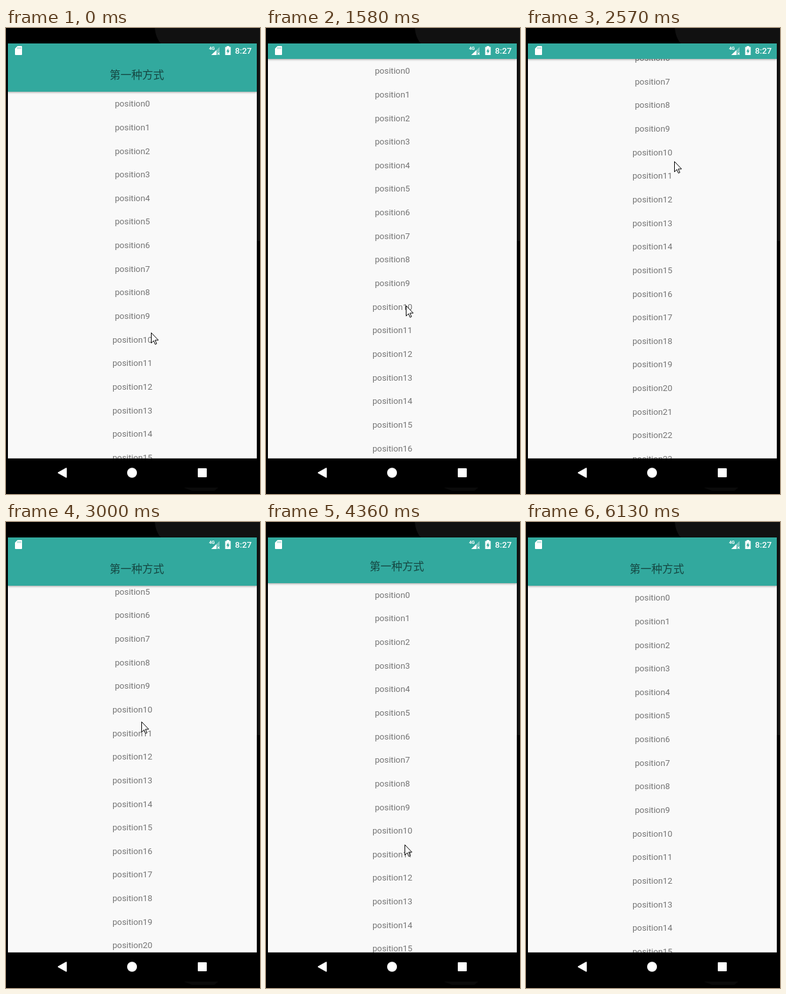
Recreate the animation shown at these times as an HTML page. Size 396 by 724 pixels, loop 7100 ms.

```html
<!DOCTYPE html>
<html lang="zh">
<head>
<meta charset="utf-8">
<title>Collapsing toolbar</title>
<style>
  html, body { margin: 0; width: 100%; height: 100%; overflow: hidden; background: #000; }
  #stage { position: relative; width: 396px; height: 724px; overflow: hidden; background: #000; font-family: Roboto, sans-serif; }
  #stage > svg { position: absolute; left: 0; top: 0; }
  #screen { position: absolute; left: 3px; top: 24px; width: 388px; height: 645px; overflow: hidden; background: #f9f9f9; }
  #screen::after { content: ""; position: absolute; left: 0; bottom: 0; width: 100%; height: 1px; background: rgba(0, 0, 0, .3); }
  #list { position: absolute; left: 0; top: 76.3px; width: 100%; }
  .row { position: absolute; width: 100%; text-align: center; font-size: 13.2px; line-height: 36.64px; color: #757575; }
  #bar { position: absolute; left: 0; top: 22px; width: 100%; height: 53px; background: #32a99e; box-shadow: 0 1px 3px rgba(0, 0, 0, .36); }
  #title { position: absolute; left: 158.5px; top: -1px; font: 17px/53px "Noto Sans CJK SC", "Noto Sans CJK", sans-serif; color: rgba(0, 0, 0, .58); white-space: nowrap; }
  #status { position: absolute; left: 0; top: 0; width: 100%; height: 22px; background: #32a99e; }

  /* Every stretch of motion is a straight move cut into equal held steps. */
  #list, #bar, #stage > #cursor { animation: scroll 7.1s steps(1) infinite; }
  #bar { animation-name: collapse; }
  #stage > #cursor { animation-name: point; }

  @keyframes scroll {
    0% { margin-top: 0; }
    18.3% { margin-top: -1px; animation-timing-function: steps(2); }
    22.25% { margin-top: -51px; animation-timing-function: steps(4); }
    30.28% { margin-top: -291px; animation-timing-function: steps(2); }
    34.22% { margin-top: -293px; }
    36.19% { margin-top: -291px; animation-timing-function: steps(3); }
    42.25% { margin-top: -192.7px; animation-timing-function: steps(5); }
    52.11% { margin-top: -6.5px; }
    54.08% { margin-top: 0; }
    59.15% { margin-top: -1px; animation-timing-function: steps(2); }
    63.52% { margin-top: -8px; animation-timing-function: steps(3); }
    69.01% { margin-top: -59.5px; }
    73.38%, 100% { margin-top: 0; }
  }
  @keyframes collapse {
    0% { margin-top: 0; }
    18.3% { margin-top: -1px; animation-timing-function: steps(2); }
    22.25% { margin-top: -51px; }
    24.36%, 34.22% { margin-top: -53px; }
    36.19% { margin-top: -51px; animation-timing-function: steps(2); }
    40.14% { margin-top: 0; }
    59.15% { margin-top: -1px; animation-timing-function: steps(2); }
    63.52% { margin-top: -8px; animation-timing-function: steps(2); }
    67.32% { margin-top: -53px; }
    73.38%, 100% { margin-top: 0; }
  }
  @keyframes point {
    0% { left: 226px; top: 473px; animation-timing-function: steps(3); }
    5.49% { left: 219px; top: 488px; animation-timing-function: steps(3); }
    10.98% { left: 217px; top: 507px; }
    14.78% { left: 217px; top: 507px; animation-timing-function: steps(4); }
    22.25% { left: 218px; top: 431px; animation-timing-function: steps(4); }
    30.28% { left: 232px; top: 217px; animation-timing-function: steps(2); }
    34.22% { left: 231px; top: 207px; animation-timing-function: steps(4); }
    42.25% { left: 211px; top: 310px; animation-timing-function: steps(5); }
    52.11% { left: 208px; top: 497px; animation-timing-function: steps(4); }
    59.15% { left: 214px; top: 511px; animation-timing-function: steps(2); }
    63.52% { left: 217px; top: 490px; animation-timing-function: steps(3); }
    69.01% { left: 233px; top: 210px; }
    71.12% { left: 233px; top: 207px; }
    73.38% { left: 200px; top: 291px; animation-timing-function: steps(3); }
    78.73% { left: 280px; top: 620px; animation-timing-function: steps(4); }
    86.33%, 100% { left: 346px; top: 740px; }
  }
</style>
</head>
<body>
<div id="stage">
  <!-- device casing -->
  <svg width="396" height="724">
    <path d="M232 0H396V331H391V24H241Q233 14 232 0Z" fill="#111"/>
    <path d="M277 714H331L325 719H290Z" fill="#0a0a0a"/>
  </svg>
  <div id="screen">
    <div id="list"></div>
    <div id="bar"><div id="title">第一种方式</div></div>
    <div id="status"></div>
  </div>
  <!-- status and navigation icons -->
  <svg width="396" height="724" fill="#fff">
    <path d="M18 28H24Q25 28 25 29V41Q25 42 24 42H15Q14 42 14 41V32Z"/>
    <path d="M18.5 30V32.5M20.7 30V32.5M22.9 30V32.5" stroke="#32a99e" stroke-width=".7"/>
    <text x="316.5" y="34" font-size="7.2" font-weight="700">4G</text>
    <path d="M333 29.5V42H320Z" opacity=".35"/>
    <path d="M328 34.5V42H320Z"/>
    <path d="M329 37.5H334V42H329Z" fill="#32a99e"/>
    <path d="M329.7 38.2L333 41.5M333 38.2L329.7 41.5" stroke="#fff" stroke-width="1.1"/>
    <path d="M344 28H348V29.5H350.3V42H341.7V29.5H344Z"/>
    <path d="M346.6 31.5L343.6 36.7H345.5V40.3L348.5 35.1H346.6Z" fill="#32a99e"/>
    <text x="357" y="40" font-size="13.2" font-weight="500">8:27</text>
    <path d="M81.5 691L94 684V698Z" stroke="#fff" stroke-width="1.5" stroke-linejoin="round"/>
    <circle cx="196.5" cy="691" r="7.7"/>
    <rect x="299" y="684" width="14" height="14" rx="1"/>
  </svg>
  <svg id="cursor" width="12" height="19">
    <path d="M.5 .5V16.5L4.2 12.9 6.6 18.5 8.9 17.5 6.4 12H11.5Z" fill="#fff" stroke="#000" stroke-linejoin="round"/>
  </svg>
</div>
<script>
const PITCH = 36.64, list = document.getElementById('list');

for (let i = 0; i < 26; i++) {
  const row = document.createElement('div');
  row.className = 'row';
  row.style.top = i * PITCH + 'px';
  row.textContent = 'position' + i;
  list.append(row);
}
</script>
</body>
</html>
```
